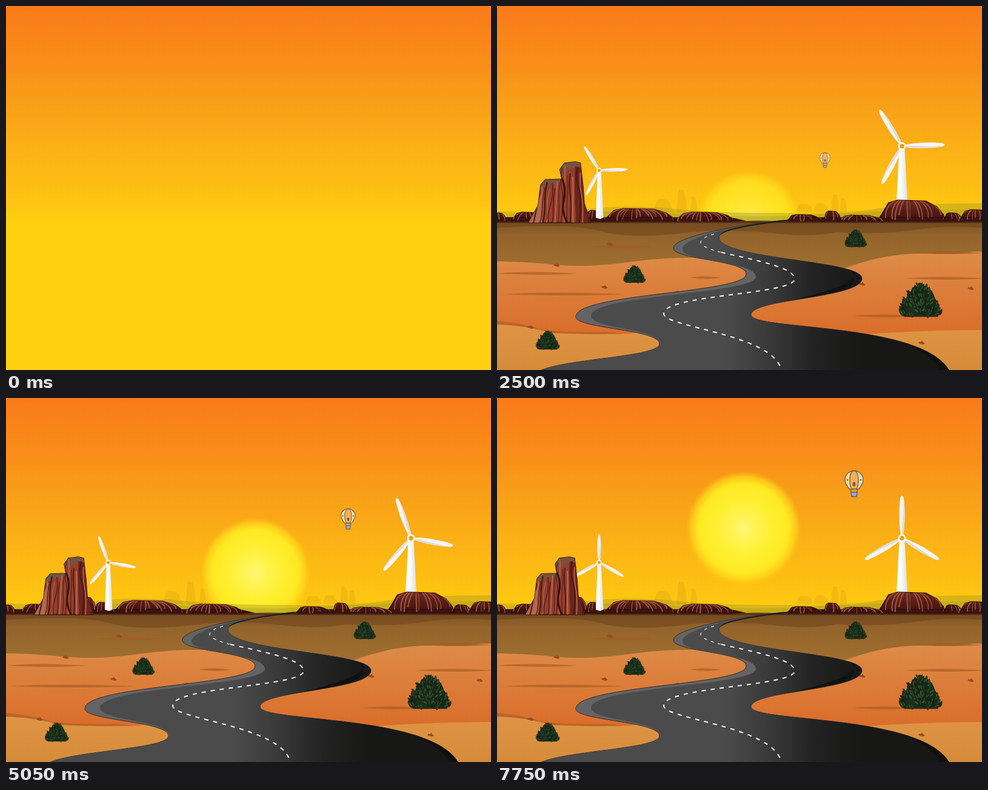
An HTML page for the animation above (7850 ms loop, 800 by 600 pixels).

```html
<!DOCTYPE html>
<html lang="en">
<head>
<meta charset="utf-8">
<title>Desert road</title>
<style>
html, body { margin: 0; width: 100%; height: 100%; overflow: hidden; }
svg { display: block; width: 100vw; height: 100vh; }
</style>
</head>
<body>
<svg viewBox="0 0 800 600" preserveAspectRatio="none">
  <defs>
    <linearGradient id="sky" x2="0" y2="1">
      <stop stop-color="#fa7a1a"/><stop offset=".17" stop-color="#f99019"/>
      <stop offset=".25" stop-color="#f89d18"/><stop offset=".42" stop-color="#fcb515"/>
      <stop offset=".55" stop-color="#fec611"/><stop offset=".6" stop-color="#ffd010"/>
    </linearGradient>
    <radialGradient id="sunFill">
      <stop stop-color="#fff573"/><stop offset=".22" stop-color="#fff352"/>
      <stop offset=".5" stop-color="#ffef30"/><stop offset=".78" stop-color="#ffe922"/>
      <stop offset=".9" stop-color="#ffdd1c" stop-opacity=".65"/>
      <stop offset="1" stop-color="#ffc814" stop-opacity="0"/>
    </radialGradient>
    <linearGradient id="mesaFill" gradientUnits="userSpaceOnUse" x1="0" y1="320" x2="0" y2="357">
      <stop stop-color="#6e2d20"/><stop offset=".5" stop-color="#541c16"/><stop offset="1" stop-color="#351010"/>
    </linearGradient>
    <linearGradient id="far" x2="0" y2="1">
      <stop stop-color="#7c5424"/><stop offset=".3" stop-color="#93642b"/><stop offset="1" stop-color="#a06f30"/>
    </linearGradient>
    <linearGradient id="mid" gradientUnits="userSpaceOnUse" x1="0" y1="405" x2="0" y2="545">
      <stop stop-color="#dd8c48"/><stop offset="1" stop-color="#da6c29"/>
    </linearGradient>
    <linearGradient id="near" gradientUnits="userSpaceOnUse" x1="0" y1="525" x2="0" y2="600">
      <stop stop-color="#df9445"/><stop offset="1" stop-color="#d58c3a"/>
    </linearGradient>
    <linearGradient id="tar" gradientUnits="userSpaceOnUse" x1="375" y1="0" x2="600" y2="0">
      <stop stop-color="#4b4b4b"/><stop offset=".35" stop-color="#383838"/>
      <stop offset=".65" stop-color="#232323"/><stop offset="1" stop-color="#171715"/>
    </linearGradient>
    <linearGradient id="steel">
      <stop offset=".35" stop-color="#fff"/><stop offset="1" stop-color="#dedede"/>
    </linearGradient>
    <clipPath id="mesaClip"><path class="mesaShape"/></clipPath>
    <clipPath id="roadClip"><path class="roadShape"/></clipPath>
    <path id="buttePath" d="M47 357L62 330L66 298L73 290L99 289L96 274L103 264L120 262L128 264L132 300L134 327L144 357Z"/>
    <clipPath id="butteClip"><use href="#buttePath"/></clipPath>
    <g id="blade">
      <path d="M-2-6C-5-20-5.500-52-2.500-67Q0-74 2.500-67C5.500-52 5-20 2-6Z" fill="#f6f5f2"/>
      <path d="M2.500-67C5.500-52 5-20 2-6L0-8C-1-24 3-40 2.500-67Z" fill="#dfddd9"/>
    </g>
    <g id="rotor">
      <use href="#blade"/><use href="#blade" transform="rotate(120)"/><use href="#blade" transform="rotate(240)"/>
      <circle r="5.200" fill="#f59a20" stroke="#fff" stroke-width="2.600"/>
    </g>
    <g id="bush" stroke="#101c12" stroke-width=".7"></g>
  </defs>

  <rect width="800" height="600" fill="url(#sky)"/>
  <circle id="sun" r="95" fill="url(#sunFill)"/>

  <g id="land">
    <path id="haze" fill="#c98e16" opacity=".22"/>
    <path d="M0 338Q90 343 140 336Q210 326 290 334T470 341Q560 344 620 335T800 325V358H0Z" fill="#a89a20" opacity=".42"/>
    <path d="M0 347Q140 334 280 342T520 344T800 334V358H0Z" fill="#94901f" opacity=".28"/>
    <path d="M659 322L663.500 236H672.500L677 322Z" fill="url(#steel)"/>
    <use href="#rotor" class="rotor" data-at="668,231" data-size="1"/>
    <path class="mesaShape" fill="url(#mesaFill)" stroke="#2c0d0c" stroke-width="1.500" stroke-linejoin="round"/>
    <g id="mesaLines" clip-path="url(#mesaClip)" fill="none" stroke="#a2543e"></g>
    <path d="M163 349L165.800 275H171.800L175.500 349L170 351Z" fill="url(#steel)"/>
    <use href="#rotor" class="rotor" data-at="168.5,271" data-size=".66"/>

    <path d="M0 357H380Q430 350 490 357H800V435H0Z" fill="url(#far)"/>
    <path d="M0 357H800V366Q740 361 690 369T560 373Q520 381 470 376Q380 365 310 374Q220 385 170 371T0 366Z" fill="#693f1c" opacity=".45"/>
    <path d="M0 356.500H800" stroke="#4b2a12" stroke-width="2"/>
    <path d="M0 421Q40 421 80 425T150 428C210 427 240 414 330 415Q450 430 570 433C610 420 650 406 720 408S770 403 800 405V600H0Z" fill="url(#mid)"/>
    <path d="M0 519Q45 523 78 534Q125 539 180 537L220 541H0Z" fill="#a95e25" opacity=".65"/>
    <path d="M0 525Q50 527 90 539Q160 542 220 540Q310 520 400 538T580 544Q660 535 800 534V600H0Z" fill="url(#near)"/>
    <g id="streaks" fill="#a55b24" opacity=".65"></g>
    <g id="stones" fill="#984b22"></g>
  </g>

  <g id="road">
    <path class="roadShape" fill="#646464" stroke="#30302f"/>
    <path id="lane" fill="url(#tar)"/>
    <g clip-path="url(#roadClip)">
      <path d="M480 352C400 362 366 370 366 381Q368 391 390 397Q372 381 394 372Q420 362 480 355Z" fill="#131313"/>
      <path d="M570 424C625 450 560 469 427 499C480 485 550 478 580 463Q602 447 570 424Z" fill="#111"/>
      <path d="M610 537Q675 550 706 574Q727 590 732 602H750Q730 560 680 545Z" fill="#10100f"/>
    </g>
    <g fill="none" stroke="#fff">
      <path id="dashFar" stroke-width="1.100" stroke-dasharray="5 7"/>
      <path id="dashNear" stroke-width="1.900" stroke-dasharray="7 8"/>
    </g>
  </g>

  <g id="butte">
    <use href="#buttePath" fill="#943f2d" stroke="#3a1411" stroke-width="1.500"/>
    <g clip-path="url(#butteClip)">
      <path d="M45 358L64 318L72 300L68 358Z" fill="#b06a50"/>
      <path d="M120 262H150V358H122Q117 310 120 262Z" fill="#6b261c"/>
      <path d="M60 302L72 288H102L97 298L80 297L68 306ZM92 287L100 260H134L131 272L120 269L106 277Z" fill="#77513f"/>
      <g id="butteLines" fill="none"></g>
      <path d="M99 288Q106 302 102 322T108 358" fill="none" stroke="#351110" stroke-width="3"/>
    </g>
  </g>

  <g id="bushes"></g>

  <g id="balloon" stroke="#6f625d" stroke-width="1.500">
    <path d="M-5 9V14.500M5 9V14.500"/>
    <path d="M0-21C9-21 15-14 15-6C15 1 10 5 8 9H-8C-10 5-15 1-15-6C-15-14-9-21 0-21Z" fill="#ffe0a0"/>
    <path d="M-3-20.500C-9-12-8 2-4 9H4C8 2 9-12 3-20.500Z" fill="#f9b055"/>
    <ellipse cy="1" rx="1.600" ry="3" fill="#6b4a42"/>
    <circle cx="-11" cy="-6" r=".7"/><circle cx="11" cy="-6" r=".7"/>
    <path d="M-5 14.500H5L4 21.500H-4Z" fill="#91a9ee" stroke="#646078"/>
  </g>
</svg>

<script>
const LOOP = 7850, LAST = 7750, STEP = 50, HORIZON = 357;
const $ = id => document.getElementById(id);
const clamp = v => Math.max(0, Math.min(1, v));
const ramp = (t, start, length) => clamp((t - start) / length);
const repeat = (n, make) => Array.from({ length: n }, (_, i) => make(i)).join('');
const setPath = (id, d) => $(id).setAttribute('d', d);
const setShape = (cls, d) => document.querySelectorAll('.' + cls).forEach(el => el.setAttribute('d', d));

let seed = 7;
const rnd = (lo = 0, hi = 1) => {
  seed = (seed * 16807) % 2147483647;
  return lo + (hi - lo) * seed / 2147483647;
};

// S-curves between the outermost points of each bend
const bends = points => points.slice(1).map(([x, y], i) => {
  const [px, py] = points[i], k = .45 * (y - py);
  return `C${px} ${py + k} ${x} ${y - .55 * (y - py)} ${x} ${y}`;
}).join('');

const leftSide = (...points) => `M475 353C420 358 ${points[0][0]} 378 ${points[0]}` + bends([...points, [60, 612]]);
const rightSide = 'L746 612V601C700 520 419 535 419 509' +
  bends([[419, 509], [602, 449], [366, 381]]) + 'C366 370 420 360 480 354Z';
setShape('roadShape', leftSide([291, 399], [411, 442], [130, 512], [268, 557]) + rightSide);
setPath('lane', leftSide([306, 401], [427, 446], [155, 511], [269, 557]) + rightSide);
setPath('dashFar', 'M358 376Q336 382 336 390Q340 399 370 406');
setPath('dashNear', 'M370 406C420 418 491 430 491 450' + bends([[491, 450], [275, 507]]) + 'C275 530 455 540 469 600');

// Weathered block standing on a base line
const profile = [[0, 0], [.1, .5], [.17, .88], [.3, 1], [.7, .96], [.86, .7], [.95, .35], [1, 0]];
const boulder = (x, w, h, base = HORIZON) =>
  'M' + profile.map(([u, v]) => [x + u * w, base - v * h]).join('L') + 'Z';

// Left, width, height
const mesas = [[-12, 28, 16], [22, 64, 17], [82, 40, 33], [114, 36, 29], [145, 32, 20], [172, 124, 23],
  [290, 104, 17], [476, 60, 13], [538, 30, 19], [560, 76, 12], [626, 116, 37], [736, 32, 16], [760, 70, 21]];
setShape('mesaShape', 'M0 349H385L420 357H0ZM468 357L490 349H800V357Z' + mesas.map(m => boulder(...m)).join(''));
$('mesaLines').innerHTML = mesas.map(([x, w, h]) => {
  const n = Math.round(w / 9);
  return repeat(n, i => {
    const f = (i + rnd(.2, .8)) / n, top = x + w * (.22 + .5 * f), foot = x + w * f, y = HORIZON - h;
    return `<path d="M${top} ${y}Q${foot} ${y + h * .25} ${foot + rnd(-3, 3)} ${y + h * rnd(.55, .9)}" stroke-width="${rnd(.8, 2.2)}"/>`;
  });
}).join('');

const towers = [[258, 32, 22], [296, 17, 38], [319, 11, 26], [493, 28, 14], [522, 25, 15], [551, 13, 30], [565, 12, 24]];
setPath('haze', towers.map(t => boulder(...t, 340)).join(''));

$('butteLines').innerHTML = repeat(20, i => {
  const x = 64 + i * 4, lean = (x - 112) * .2, top = x < 98 ? rnd(292, 304) : rnd(266, 286);
  const color = ['#451713', '#b9674e', '#6a241a'][i % 3];
  return `<path d="M${x} ${top}q${rnd(-5, 3)} 18 ${lean / 2} 34T${x + lean} 358" stroke="${color}" stroke-width="${rnd(1, 2.2)}"/>`;
});

// Left, y, length
const streaks = [[0, 441, 132], [8, 475, 202], [318, 448, 52], [588, 511, 104], [674, 449, 130], [150, 397, 112], [680, 407, 122]];
$('streaks').innerHTML = streaks.map(([x, y, w]) =>
  `<path d="M${x} ${y}q${w * .4}-5 ${w} 0q${-w * .4} 4 ${-w} 0Z"/>`).join('');

const stones = [[186, 393], [98, 428], [177, 464], [297, 473], [55, 530], [602, 459], [781, 466], [700, 556]];
$('stones').innerHTML = stones.map(([x, y]) => `<path d="M${x - 5} ${y}l2-3l2 1l2-2l2 2l3 3l-4 1Z"/>`).join('');

// Dome of pointed leaves, 76 wide and 60 high, standing on y = 0
$('bush').innerHTML = '<path d="M-27 0Q-36-16-23-30Q-14-51 1-52Q18-49 23-30Q36-16 28 0Z" fill="#1b2f1c"/>' +
  repeat(150, i => {
    const a = rnd(0, Math.PI), r = Math.sqrt(rnd(.02, 1));
    const x = 33 * r * Math.cos(a) * (1.05 - .25 * Math.sin(a)), y = -2 - 52 * r * Math.sin(a);
    const turn = Math.cos(a) * 50 + rnd(-35, 35) - 90;
    const color = ['#2c4a28', '#35552d', '#1a2c1a', '#274226'][i % 4];
    return `<path d="M-5 0Q0-4 6 0Q0 4-5 0Z" fill="${color}" transform="translate(${x} ${y}) rotate(${turn})"/>`;
  });

// Foot x, foot y, size, start
const bushes = [[699, 512, 1, 1000], [592, 397, .51, 1500], [227, 456, .51, 1500], [84, 566, .55, 1500]];
$('bushes').innerHTML = '<g><use href="#bush"/></g>'.repeat(bushes.length);
const bushNodes = [...$('bushes').children];
const rotors = [...document.querySelectorAll('.rotor')];

const place = (el, x, y, scale = 1, turn = 0) =>
  el.setAttribute('transform', `translate(${x} ${y}) rotate(${turn}) scale(${Math.max(.02, scale)})`);
const fade = (el, v) => { el.style.opacity = v; };
const overshoot = u => 1 + 2.7 * (u - 1) ** 3 + 1.7 * (u - 1) ** 2;

function draw(t) {
  const left = LAST - t;
  fade($('land'), ramp(t, 250, 500));
  rotors.forEach(el => place(el, ...el.dataset.at.split(','), el.dataset.size, -left * .0518));

  place($('sun'), 407 + left * .0015, 215 + left * .0271, 1 - left * .000015);
  fade($('sun'), ramp(t, 900, 2200));

  const slide = ramp(t, 1000, 800);
  place($('road'), -50 * (1 - slide), 0);
  fade($('road'), slide);

  bushes.forEach(([x, y, size, start], i) => {
    const p = ramp(t, start, 800);
    place(bushNodes[i], x - 8 * size * (1 - p), y - 4 * size * (1 - p), size * p);
    fade(bushNodes[i], p);
  });

  const rise = ramp(t, 1800, 900), grow = overshoot(rise);
  place($('butte'), -48 * (1 - grow), HORIZON * (1 - grow), grow);
  fade($('butte'), clamp(rise * 2));

  place($('balloon'), 589 - left * .00914, 141 + left * .0215, 1 - left * .000081);
  fade($('balloon'), ramp(t, 1800, 500));
}

function tick() {
  const t = performance.now() % LOOP;
  draw(Math.min(LAST, Math.floor(t / STEP) * STEP));
  requestAnimationFrame(tick);
}
tick();
</script>
</body>
</html>
```
